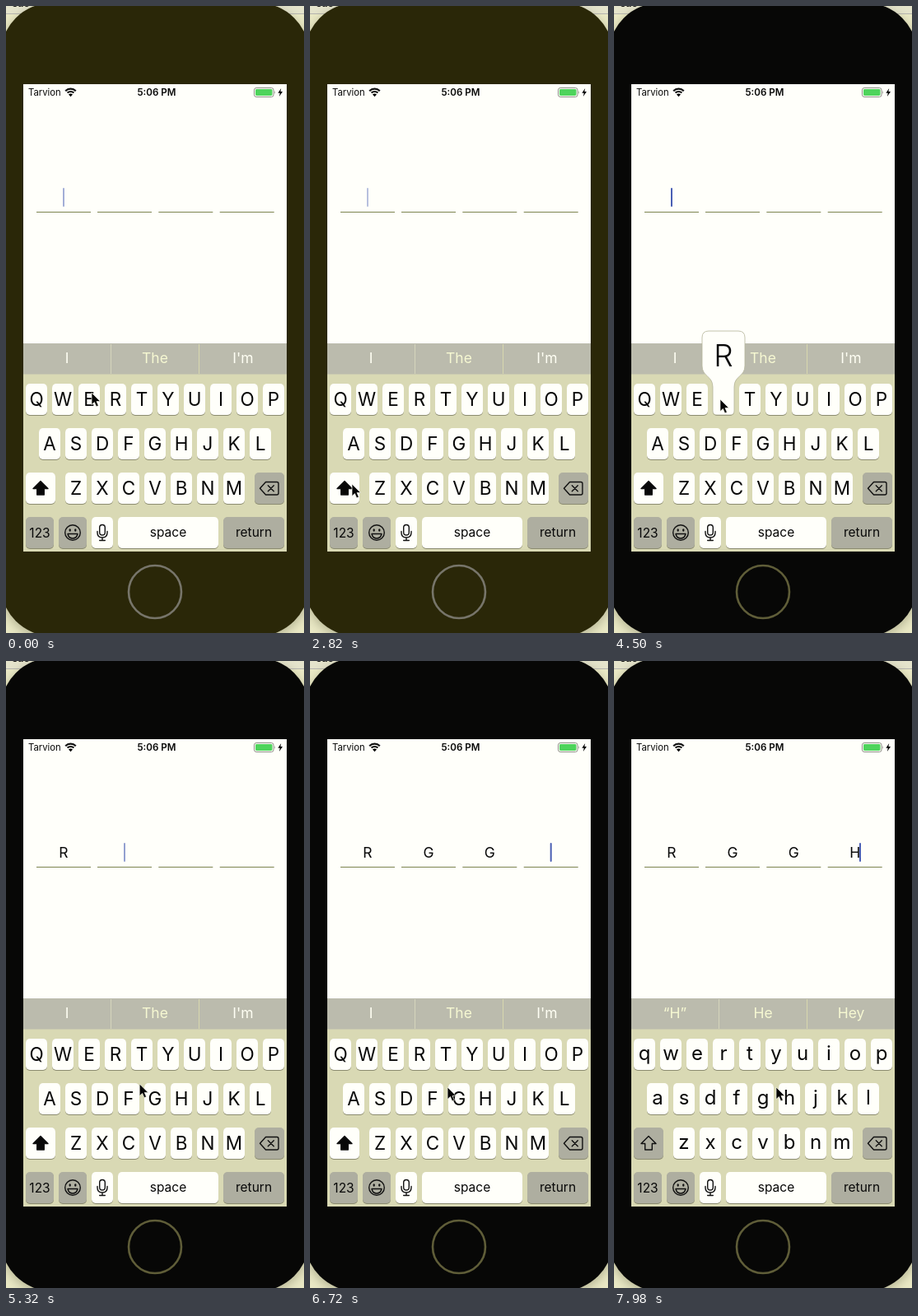
Animation, 362 px wide and 762 px high, one loop 8000 ms. Source, as an HTML page:

```html
<!DOCTYPE html>
<html lang="en">
<head>
<meta charset="utf-8">
<title>Code entry</title>
<style>
html, body { margin: 0; width: 100%; height: 100%; overflow: hidden; background: #ebeac6; }
svg { display: block; width: 100%; height: 100%; }
text { font-family: Inter, Roboto, sans-serif; fill: #080808; text-anchor: middle; }
.line { fill: none; stroke: #111; stroke-width: 1.4; stroke-linecap: round; stroke-linejoin: round; }
</style>
</head>
<body>
<svg id="stage" viewBox="0 0 362 762" preserveAspectRatio="none"></svg>
<script>
const LOOP = 8000;
const WHITE = '#fffffa', GREY = '#aeaea0';
const CELLS = [70, 144, 218.3, 292.7];
const ROWS = [['QWERTYUIOP', 24, 459], ['ASDFGHJKL', 40, 513], ['ZXCVBNM', 72, 567]];
// key, press time, release time
const PRESSES = [['R', 4420, 4640], ['G', 5580, 5720], ['G', 6440, 6580], ['H', 7500, 7660]];
// start, end, x, y
const MOVES = [
  [0, 0, 104, 470], [250, 1150, 61, 573], [1700, 2300, 51, 581],
  [3250, 4250, 129, 478], [4800, 5450, 166, 518], [6680, 7050, 197, 518]
];

const stage = document.getElementById('stage');

function add(tag, attrs, parent = stage, content) {
  const el = document.createElementNS('http://www.w3.org/2000/svg', tag);
  for (const k in attrs) el.setAttribute(k, attrs[k]);
  if (content !== undefined) el.textContent = content;
  parent.append(el);
  return el;
}
const set = (el, k, v) => el.setAttribute(k, v);
const show = (el, on) => set(el, 'visibility', on ? 'visible' : 'hidden');
const rect = (x, y, width, height, fill, rx = 0) => add('rect', { x, y, width, height, fill, rx });
const path = (d, attrs = {}) => add('path', { d, ...attrs });
const label = (s, x, y, size, attrs = {}) => add('text', { x, y, 'font-size': size, ...attrs }, stage, s);

function key(x, y, w, fill = WHITE) {
  rect(x, y + 1, w, 38, '#8b8b70', 5);
  return rect(x, y, w, 38, fill, 5);
}

// Desktop behind the device
rect(0, 0, 362, 762, '#ebeac6');
rect(0, 0, 362, 9, '#e5e4cc');
rect(0, 9, 362, 1, '#b6b5b0');
label('sue', 18, 1, 12, { 'font-weight': 600 });

// Device
const blur = add('filter', { id: 'soft', x: '-10%', y: '-10%', width: '120%', height: '120%' });
add('feGaussianBlur', { stdDeviation: 7 }, blur);
const shell = { x: -7, y: -4, width: 376, height: 770, rx: 64 };
add('rect', { ...shell, y: 0, fill: '#77765c', opacity: .5, filter: 'url(#soft)' });
const body = add('rect', shell);
const ring = add('circle', { cx: 181, cy: 712, r: 32, fill: 'none', 'stroke-width': 2.6 });
rect(21, 95, 320, 568, WHITE);

// Status bar
label('Tarvion', 27, 109, 11.3, { style: 'text-anchor:start' });
for (const [r, w] of [[9, 2.2], [5.6, 2.2]]) {
  const s = r * .7;
  path(`M${78.5 - s} ${109.5 - s}A${r} ${r} 0 0 1 ${78.5 + s} ${109.5 - s}`,
    { class: 'line', style: `stroke-width:${w};stroke-linecap:butt` });
}
path('M78.5 110.2L76 107.4Q78.5 105.4 81 107.4Z');
label('5:06 PM', 183, 109, 11.6, { 'font-weight': 600 });
add('rect', { x: 301.5, y: 99.5, width: 23.5, height: 11, rx: 2.6, fill: 'none', stroke: '#8e8e86' });
rect(303, 101, 20.5, 8, '#4ed45c', 1.4);
path('M326.3 103V107Q328 105 326.3 103Z', { fill: '#8e8e86' });
path('M334.2 100L330.4 105.7H332.8L331.9 110L336 104.1H333.4Z');

// Input cells
const slots = CELLS.map(x => {
  rect(x - 33, 250, 66, 1, '#7d8450');
  return label('', x, 239, 17.5);
});
const caret = rect(0, 221, 2, 23, '#4a5fb4', 1);

// Suggestions
rect(21, 410, 320, 38, '#bbbbad');
rect(127, 411, 1, 36, '#d5d5bc');
rect(234, 411, 1, 36, '#d8d8ae');
const hints = [74, 181, 288].map(x => label('', x, 434, 17.5));

// Keyboard
rect(21, 447.5, 320, 215.5, '#d9d9b4');
const caps = [];
for (const [letters, x0, y] of ROWS) {
  [...letters].forEach((ch, i) => {
    const x = x0 + 32 * i;
    key(x, y, 26);
    caps.push({ ch, x: x + 13, y, el: label(ch, x + 13, y + 27, 22.5) });
  });
}
const shiftKey = key(24, 567, 36);
const shiftArrow = path('M42 577.5L51 586.5H46.3V594H37.7V586.5H33Z',
  { stroke: '#111', 'stroke-width': 1.4, 'stroke-linejoin': 'round' });
key(302, 567, 36, GREY);
path('M315.5 578.5H329Q331 578.5 331 580.5V592Q331 594 329 594H315.5L308.5 586.2Z', { class: 'line' });
path('M318.3 582.7L325.3 589.7M325.3 582.7L318.3 589.7', { class: 'line' });

key(24, 621, 34, GREY);
label('123', 41, 646, 15.5);
key(64, 621, 34, GREY);
add('circle', { cx: 81, cy: 640, r: 9.3, class: 'line' });
for (const cx of [77.7, 84.3]) add('ellipse', { cx, cy: 637, rx: 1.2, ry: 1.8, fill: '#111' });
path('M75 641.5H87Q86 647 81 647T75 641.5Z', { class: 'line' });
key(104, 621, 26);
add('rect', { x: 113.7, y: 630.5, width: 6.6, height: 12.5, rx: 3.3, class: 'line' });
path('M111 638.5V640Q111 646 117 646T123 640V638.5M117 646V649.5M113.7 649.5H120.3', { class: 'line' });
key(136, 621, 122);
label('space', 197, 645, 15.5);
key(264, 621, 74, GREY);
label('return', 301, 645, 15.5);

// Key balloon, placed at the top centre of the pressed key
const balloon = add('g', {});
add('path', {
  d: 'M-18 -64H18Q26 -64 26 -56V-22C26 -8 13 -10 13 4V33Q13 38 8 38H-8Q-13 38 -13 33V4C-13 -10 -26 -8 -26 -22V-56Q-26 -64 -18 -64Z',
  fill: WHITE, stroke: '#b4b49a', 'stroke-width': .8
}, balloon);
const balloonText = add('text', { y: -21, 'font-size': 37, 'font-weight': 300 }, balloon, '');

const pointer = path('M0 0V14.6L3.4 11.5 5.7 16.8 8.3 15.7 6 10.5H10.5Z',
  { fill: '#050505', stroke: '#f4f4e8', 'stroke-width': .7 });

const clamp = v => Math.max(0, Math.min(1, v));
const ease = v => v * v * (3 - 2 * v);

function pointerAt(t) {
  let [, , x, y] = MOVES[0];
  for (const [a, b, tx, ty] of MOVES.slice(1)) {
    const k = ease(clamp((t - a) / (b - a)));
    x += (tx - x) * k;
    y += (ty - y) * k;
  }
  return [x, y];
}

function blink(p) {
  return p < .1 ? .5 + p * 5 : p < .7 ? 1 : p < .9 ? 1 - (p - .7) * 5 : (p - .9) * 5;
}

function draw(t) {
  const dark = t >= 4180;
  set(body, 'fill', dark ? '#070706' : '#2a2708');
  set(ring, 'stroke', dark ? '#5f5d38' : '#77756a');

  const typed = PRESSES.filter(p => t >= p[2]);
  const n = typed.length, done = n === 4;
  slots.forEach((el, i) => el.textContent = i < n ? typed[i][0] : '');

  const since = n ? t - typed[n - 1][2] + 100 : t;
  set(caret, 'x', done ? 298 : CELLS[n] - 1);
  set(caret, 'opacity', blink(since % 1000 / 1000));

  const words = done ? ['“H”', 'He', 'Hey'] : ['I', 'The', 'I\'m'];
  hints.forEach((el, i) => {
    el.textContent = words[i];
    el.style.fill = done || i === 1 ? '#f6f8d2' : '#fffff4';
  });

  const down = PRESSES.find(p => t >= p[1] && t < p[2]);
  for (const c of caps) {
    c.el.textContent = done ? c.ch.toLowerCase() : c.ch;
    set(c.el, 'y', c.y + (done ? 26 : 27));
    set(c.el, 'font-size', done ? 24 : 22.5);
    const pressed = down && down[0] === c.ch;
    show(c.el, !pressed);
    if (pressed) {
      set(balloon, 'transform', `translate(${c.x} ${c.y})`);
      balloonText.textContent = c.ch;
    }
  }
  show(balloon, !!down);
  set(shiftKey, 'fill', done ? GREY : WHITE);
  set(shiftArrow, 'fill', done ? 'none' : '#080808');
  set(pointer, 'transform', `translate(${pointerAt(t)})`);
}

const start = performance.now();
function tick() {
  draw((performance.now() - start) % LOOP);
  requestAnimationFrame(tick);
}
tick();
</script>
</body>
</html>
```
